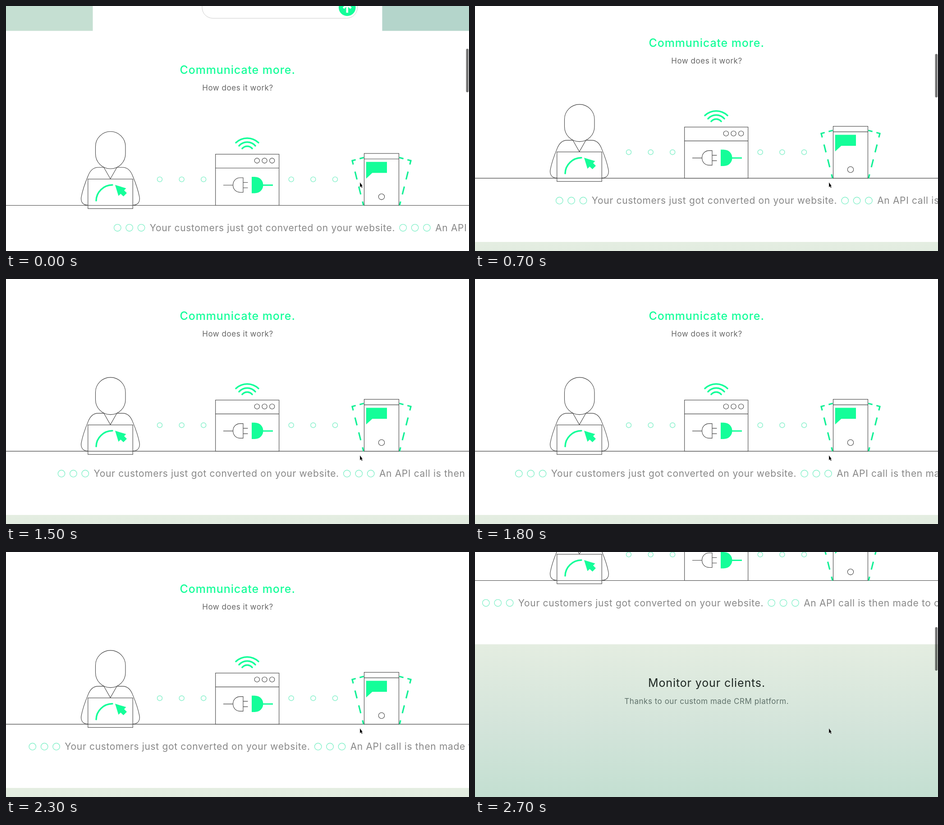
An HTML page for the animation above (2.8 s loop, 1027 by 545 pixels).

```html
<!DOCTYPE html>
<html lang="en">
<head>
<meta charset="utf-8">
<title>Communicate more</title>
<style>
  html, body { margin: 0; width: 100%; height: 100%; overflow: hidden; background: #fff; }
  svg { display: block; width: 1027px; height: 545px; }
  text { font-family: Inter, "Work Sans", "Open Sans", sans-serif; letter-spacing: .031em; }
  .mid { text-anchor: middle; }
  .title { font-size: 25px; letter-spacing: .035em; }
  .sub { font-size: 17px; }
  .line { fill: none; stroke: #444; stroke-width: 1.1; }
  .line.paper { fill: #fff; }
  .green { fill: #14fe99; }
  .stroke { fill: none; stroke: #14fe99; stroke-width: 3.5; stroke-linecap: round; }
  .dash { fill: none; stroke: #14f096; stroke-width: 3.2; }
  .edge { stroke-dasharray: 18 16.2; stroke-dashoffset: 9; }
  .top { stroke-dasharray: 9.5 9; }
  .ring { fill: none; stroke: #85f0ca; stroke-width: 1.4; }
  #ticker text { font-size: 21px; fill: #888; }
</style>
</head>
<body>
<svg viewBox="0 0 1027 545">
  <defs>
    <linearGradient id="mint" x1="0" y1="0" x2="0" y2="1">
      <stop offset="0" stop-color="#e4ede1"/>
      <stop offset=".55" stop-color="#d3e4da"/>
      <stop offset="1" stop-color="#c3dfd1"/>
    </linearGradient>
  </defs>
  <g id="page">
    <!-- hero -->
    <rect y="-60" width="192.5" height="115.3" fill="#c5dfd2"/>
    <rect x="834.5" y="-60" width="192.5" height="115.3" fill="#b4d5cb"/>
    <rect x="435" y="-60" width="344.5" height="87.3" rx="24" fill="#fff" stroke="#ccc"/>
    <circle class="green" cx="756.8" cy="3.5" r="18.8"/>
    <path d="M756.8 15V-5M748.5 5l8.3-9 8.3 9" fill="none" stroke="#fff" stroke-width="4.5"/>

    <text class="mid title" x="513.7" y="151" font-weight="500" fill="#14fe99">Communicate more.</text>
    <text class="mid sub" x="514" y="188.3" fill="#666">How does it work?</text>

    <path class="line" d="M0 443.5H1027"/>

    <!-- visitor -->
    <path class="line" d="M181.5 443C170 443 165 435 167.2 424C170 409 177 390 182 378C187 365 194 359 204 359H217L231.5 384.5L246 359H259C269 359 276 365 281 378C286 390 293 409 295.8 424C298 435 293 443 281.5 443"/>
    <rect class="line paper" x="198.5" y="279.3" width="66.5" height="82.7" rx="33.2"/>
    <rect class="line" x="181.8" y="385" width="99.5" height="65.7"/>
    <path class="stroke" d="M200 433A36.5 35.5 0 0 1 236 398"/>
    <path class="green" d="M242 398L266.5 405.5L262 410L268 416L260.5 423.5L254.3 417.7L249.5 422.5Z"/>

    <!-- browser window -->
    <path class="stroke" d="M510 304A36 36 0 0 1 560 304M517 311A24 24 0 0 1 553 311M524 317A14.5 14.5 0 0 1 546 317"/>
    <rect class="line paper" x="464.7" y="329.7" width="141" height="113.8"/>
    <path class="line" d="M465 360.5H605.5M482 398.5H503.5M526 392.5H536.5M526 404.5H536.5M526 382H520C498 382 498 414.5 520 414.5H526Z"/>
    <path class="green" d="M545 380H551C577 380 577 416.5 551 416.5H545Z"/>
    <path d="M568 398.5H592" stroke="#14fe99" stroke-width="3"/>
    <g id="buttons" class="line"></g>

    <!-- phone -->
    <path class="dash edge" d="M768 344L793 443.5M898 344L873 443.5"/>
    <path class="dash top" d="M766.5 344.4L794 337M899.5 344.4L872 337"/>
    <rect class="line paper" x="794.5" y="328" width="77" height="115.5"/>
    <path class="line" d="M794.5 340.3H871.5"/>
    <circle class="line" cx="833" cy="424.3" r="6.6"/>
    <path class="green" d="M798.8 346.8H845V371.3H812.5L798.8 384Z"/>

    <g id="dots" class="ring"></g>
    <g id="ticker"></g>

    <!-- next section -->
    <rect y="585.3" width="1027" height="340" fill="url(#mint)"/>
    <text class="mid title" x="514" y="680.3" fill="#1d2622">Monitor your clients.</text>
    <text class="mid sub" x="513.7" y="717.5" fill="#5f716a">Thanks to our custom made CRM platform.</text>
  </g>
  <rect id="bar" x="1020.5" y="95" width="5.5" height="97" rx="2.75" fill="#000" fill-opacity=".54"/>
  <path d="M785 392V403.3L787.4 401.2L789 404.6L790.8 403.7L789.2 400.4H791.2Z" fill="#000" stroke="#fff" stroke-width=".4"/>
</svg>
<script>
  const $ = id => document.getElementById(id);
  const LOOP = 2800, STEP = 100;

  // [time, value]
  const scrollKeys = [[0, 0], [100, 30], [200, 48], [300, 56], [400, 59.7], [600, 60.4],
    [2400, 60.4], [2500, 92], [2600, 215], [2700, 380]];
  const tickerKeys = [[0, 0], [400, -30], [700, -60], [1200, -98.6], [1800, -150],
    [2300, -188.5], [2700, -223]];
  // the scrollbar fades out while the page rests
  const barKeys = [[0, 1], [1200, 1], [1500, 0], [2400, 0], [2500, 1], [2700, 1]];

  const circles = (xs, y, r) => xs.map(x => `<circle cx="${x}" cy="${y}" r="${r}"/>`).join('');

  $('buttons').innerHTML = circles([556.8, 573.5, 590.2], 344, 5.6);
  $('dots').innerHTML = circles([341, 389.7, 438.2, 632.7, 681.4, 730], 385.6, 5.5);
  $('ticker').innerHTML = [
    [247.3, 'Your customers just got converted on your website.'],
    [880.7, 'An API call is then made to our platform.']
  ].map(([x, words]) =>
    `<g class="ring">${circles([x, x + 26.4, x + 52.8], 493.3, 7.7)}</g>` +
    `<text x="${x + 71.5}" y="500.6">${words}</text>`).join('');

  function at(keys, t) {
    const i = keys.findIndex(k => k[0] > t);
    if (i < 0) return keys[keys.length - 1][1];
    const [t0, a] = keys[i - 1], [t1, b] = keys[i];
    return a + (b - a) * (t - t0) / (t1 - t0);
  }

  function draw(now) {
    const t = Math.floor((now % LOOP) / STEP) * STEP;
    const y = at(scrollKeys, t);
    $('page').setAttribute('transform', `translate(0 ${-y})`);
    $('ticker').setAttribute('transform', `translate(${at(tickerKeys, t)} 0)`);
    $('bar').setAttribute('y', 95 + y * .1895);
    $('bar').setAttribute('opacity', at(barKeys, t));
  }

  const start = performance.now();
  function tick() {
    draw(performance.now() - start);
    requestAnimationFrame(tick);
  }
  tick();
</script>
</body>
</html>
```
